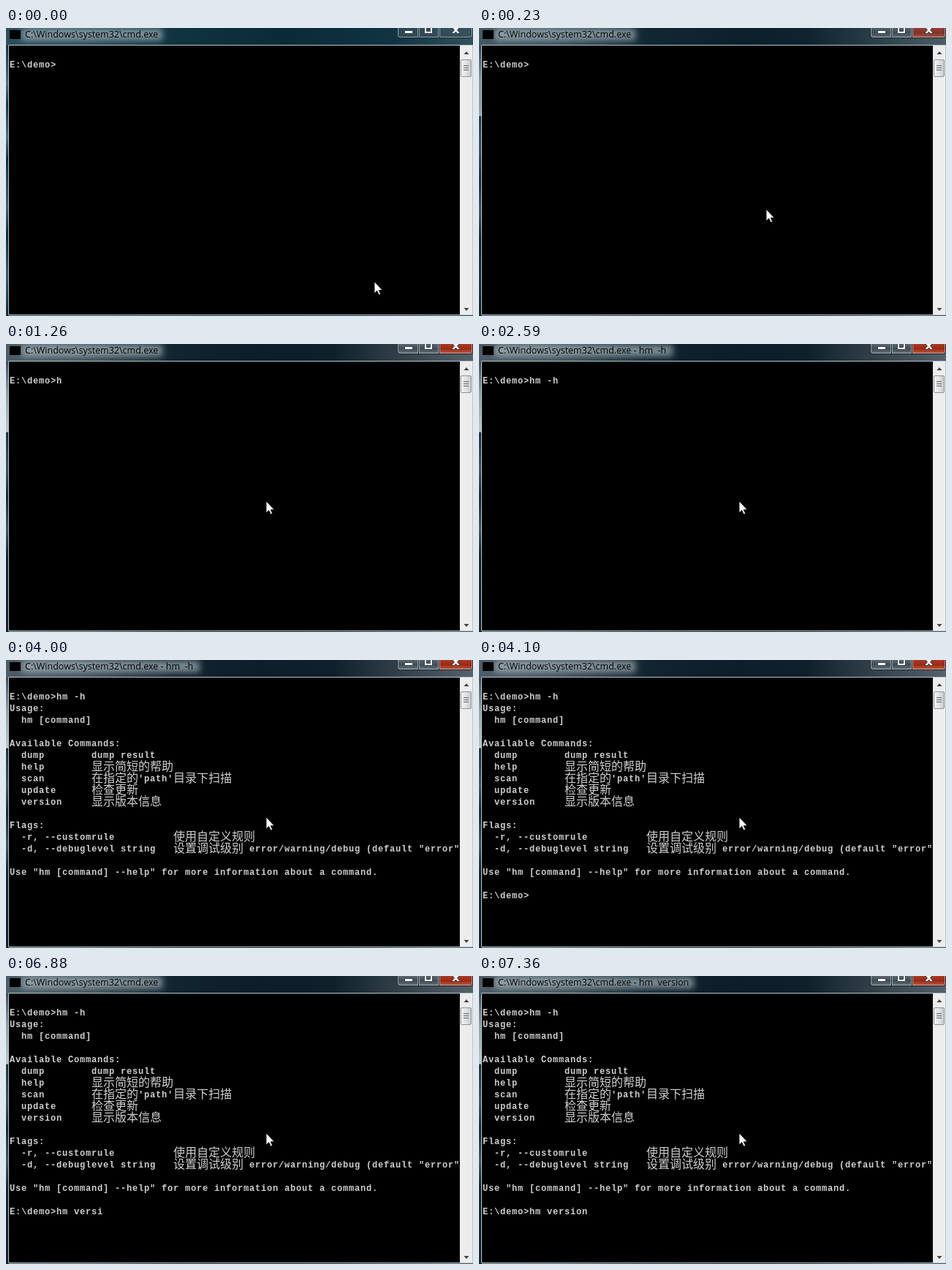
An HTML page for the animation above (8 s loop, 639 by 394 pixels).

```html
<!DOCTYPE html>
<html lang="zh">
<head>
<meta charset="utf-8">
<title>Console</title>
<style>
html, body { margin: 0; width: 100%; height: 100%; overflow: hidden; background: #000; }
svg { display: block; }
text { white-space: pre; }
#title { font: 12.5px "Open Sans", "Noto Sans", sans-serif; fill: #000; }
.mono { font: bold 12px "Liberation Mono", monospace; letter-spacing: .8px; fill: #d0d0d0; }
.cjk { font: 300 16px "Noto Sans CJK SC", "Noto Sans CJK", sans-serif; fill: #d0d0d0; }
</style>
</head>
<body>
<svg width="639" height="394" viewBox="0 0 639 394">
  <defs>
    <linearGradient id="idleBar">
      <stop offset="0" stop-color="#2c4f5b"/><stop offset=".15" stop-color="#284b57"/>
      <stop offset=".36" stop-color="#103440"/><stop offset=".6" stop-color="#0b2a37"/>
      <stop offset=".83" stop-color="#103442"/><stop offset="1" stop-color="#31505b"/>
    </linearGradient>
    <linearGradient id="liveBar">
      <stop offset="0" stop-color="#4d5d67"/><stop offset=".15" stop-color="#42535d"/>
      <stop offset=".36" stop-color="#12242f"/><stop offset=".55" stop-color="#0d1d29"/>
      <stop offset=".7" stop-color="#0f202b"/><stop offset=".83" stop-color="#2f3d46"/>
      <stop offset="1" stop-color="#56616a"/>
    </linearGradient>
    <linearGradient id="idleEdge" x2="0" y2="1">
      <stop offset="0" stop-color="#0e3240"/><stop offset=".14" stop-color="#4a6e7b"/>
      <stop offset=".22" stop-color="#123642"/><stop offset=".34" stop-color="#47707d"/>
      <stop offset=".42" stop-color="#0f313f"/><stop offset=".6" stop-color="#3c626f"/>
      <stop offset=".7" stop-color="#0d2d3a"/><stop offset=".85" stop-color="#365a67"/>
      <stop offset="1" stop-color="#0c2c39"/>
    </linearGradient>
    <linearGradient id="liveEdge" x2="0" y2="1">
      <stop offset="0" stop-color="#3b505b"/><stop offset=".12" stop-color="#8f9da5"/>
      <stop offset=".26" stop-color="#bcc7cc"/><stop offset=".262" stop-color="#1a323e"/>
      <stop offset=".4" stop-color="#3f545f"/><stop offset=".5" stop-color="#142a35"/>
      <stop offset=".62" stop-color="#40555f"/><stop offset=".72" stop-color="#12262f"/>
      <stop offset="1" stop-color="#12242e"/>
    </linearGradient>
    <linearGradient id="red" x2="0" y2="1">
      <stop offset="0" stop-color="#a83a2a"/><stop offset=".5" stop-color="#9c2814"/>
      <stop offset="1" stop-color="#c65a3c"/>
    </linearGradient>
    <linearGradient id="grey" x2="0" y2="1">
      <stop offset="0" stop-color="#5b6770"/><stop offset=".5" stop-color="#414d56"/>
      <stop offset="1" stop-color="#66727b"/>
    </linearGradient>
    <linearGradient id="thumb">
      <stop offset="0" stop-color="#f4f4f4"/><stop offset=".5" stop-color="#e2e3e5"/>
      <stop offset="1" stop-color="#c6c8cc"/>
    </linearGradient>
    <filter id="soft" x="-20%" y="-100%" width="140%" height="300%">
      <feGaussianBlur stdDeviation="4"/>
    </filter>
    <clipPath id="view"><path d="M4 24H621V392H4z"/></clipPath>
  </defs>

  <path fill="url(#idleBar)" d="M0 0H639V394H0z"/>
  <path fill="url(#idleEdge)" d="M0 24H4V394H0z"/>
  <g id="live">
    <path fill="url(#liveBar)" d="M0 0H639V394H0z"/>
    <path fill="url(#liveEdge)" d="M0 24H4V394H0z"/>
  </g>

  <rect id="glow" x="22" y="1" height="16" fill="#c3d0d6" opacity=".58" filter="url(#soft)"/>
  <rect x="5" y="3" width="15" height="12" fill="#000"/>
  <text id="title" x="26" y="13"></text>

  <path fill="#3b545f" fill-opacity=".6" d="M536 0H638V10Q638 13 635 13H539Q536 13 536 10z"/>
  <g id="hot">
    <path fill="url(#grey)" d="M536 0H592V13H539Q536 13 536 10z"/>
    <path fill="url(#red)" d="M592 0H638V10Q638 13 635 13H592z"/>
  </g>
  <path fill="none" stroke="#18262e" d="M535.5 0V10Q535.5 13.5 539 13.5H635Q638.5 13.5 638.5 10V0M564.5 0V13M592.5 0V13"/>
  <path fill="none" stroke="#c3ced4" stroke-opacity=".65"
    d="M536.5 0V10Q536.5 12.5 539 12.5H563.5V0M565.5 0V12.5H591.5V0M593.5 0V12.5H635Q637.5 12.5 637.5 10V0"/>
  <g stroke="#39444c" fill="#fff">
    <path d="M545.5 3.5H556.5V7.5H545.5z"/>
    <path fill-rule="evenodd" d="M572.5 -2V7.5H583.5V-2zM575.5 -2H580.5V4.5H575.5z"/>
    <path d="M610 -1L613.5 2.7L609.5 7.5H613.5L615.5 5L617.5 7.5H621.5L617.5 2.7L621 -1z"/>
  </g>

  <path fill="#000" d="M4 24H621V392H4z"/>
  <path fill="#ededee" d="M621 24H638V392H621z"/>
  <path fill="none" stroke="#b4c6ce" d="M3.5 23.5H638.5V392.5H3.5z"/>
  <rect x="622.5" y="43.5" width="14" height="23" rx="1.5" fill="url(#thumb)" stroke="#8f9296"/>
  <path stroke="#5c6064" d="M626 51.5H633M626 54.5H633M626 57.5H633"/>
  <path fill="#404448" d="M626.5 36L630 32L633.5 36zM626.5 383L630 387L633.5 383z"/>

  <g clip-path="url(#view)">
    <g id="first"></g><g id="help"></g><g id="second"></g>
  </g>
  <path id="mouse" fill="#fff" stroke="#000" stroke-width=".8" d="M0 0V16L3.7 12.6L6.2 18L8.6 16.9L6.2 11.8H11.2z"/>
</svg>
<script>
const $ = id => document.getElementById(id);
const LOOP = 8000, PROMPT = 'E:\\demo>', PATH = 'C:\\Windows\\system32\\cmd.exe';

const HELP = `Usage:
  hm [command]

Available Commands:
  dump        dump result
  help        显示简短的帮助
  scan        在指定的'path'目录下扫描
  update      检查更新
  version     显示版本信息

Flags:
  -r, --customrule          使用自定义规则
  -d, --debuglevel string   设置调试级别 error/warning/debug (default "error")

Use "hm [command] --help" for more information about a command.`;

// [time, value]: the latest entry not after t applies
const FIRST = [[0, ''], [1260, 'h'], [1770, 'hm'], [2110, 'hm -'], [2430, 'hm -h']];
const SECOND = [[0, null], [4100, ''], [5760, 'h'], [6080, 'hm'], [6230, 'hm v'],
  [6530, 'hm ver'], [6880, 'hm versi'], [6980, 'hm versio'], [7160, 'hm version']];
const TITLE = [[0, ''], [2590, ' - hm  -h'], [4100, ''], [7360, ' - hm  version']];
const at = (track, t) => track.filter(e => e[0] <= t).pop()[1];

function addText(parent, cls, x, y, str) {
  const el = document.createElementNS('http://www.w3.org/2000/svg', 'text');
  el.setAttribute('class', cls);
  el.setAttribute('x', x);
  el.setAttribute('y', y);
  el.textContent = str;
  parent.append(el);
  return el;
}

// Chinese characters take two 8px cells
function addLine(parent, row, str) {
  let x = 5;
  const y = 54 + row * 16;
  for (const run of str.match(/[\u4e00-\u9fff]+|[^\u4e00-\u9fff]+/g) || []) {
    const wide = run > '\u4e00';
    addText(parent, wide ? 'cjk' : 'mono', x, wide ? y + 1 : y, run);
    x += run.length * (wide ? 16 : 8);
  }
}

HELP.split('\n').forEach((str, i) => addLine($('help'), i + 1, str));
const first = addText($('first'), 'mono', 5, 54, '');
const second = addText($('second'), 'mono', 5, 326, '');

function setText(el, str) {
  if (el.textContent !== str) el.textContent = str;
}

function draw(t) {
  const k = Math.max(0, Math.min(4, Math.floor((t - 70) / 80) + 1)) / 4;
  $('live').setAttribute('opacity', k);
  $('hot').setAttribute('opacity', k);
  $('mouse').setAttribute('transform', `translate(${504 - 148 * k} ${347 - 132 * k})`);

  const suffix = at(TITLE, t), typed = at(SECOND, t);
  setText($('title'), PATH + suffix);
  $('glow').setAttribute('width', suffix ? (suffix.length > 10 ? 272 : 243) : 192);
  setText(first, PROMPT + at(FIRST, t));
  setText(second, typed === null ? '' : PROMPT + typed);
  $('help').setAttribute('visibility', t >= 4000 ? 'visible' : 'hidden');
}

const start = performance.now();
function tick() {
  draw((performance.now() - start) % LOOP);
  requestAnimationFrame(tick);
}
tick();
</script>
</body>
</html>
```
